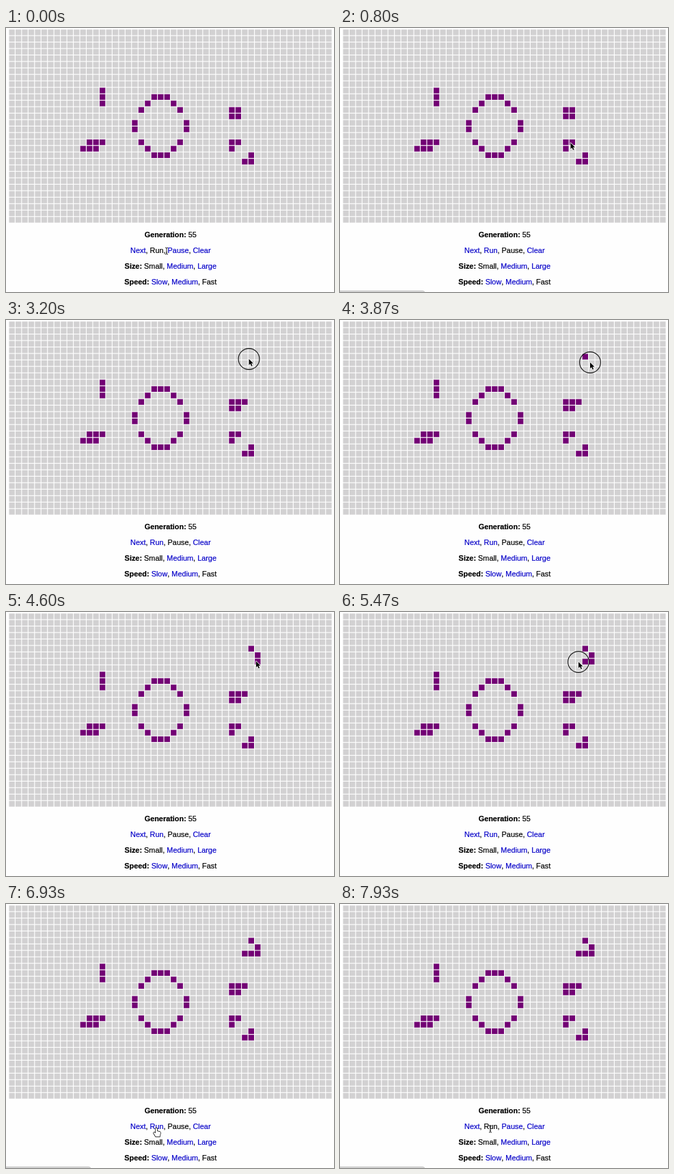
An HTML page with a canvas that plays this animation: 480x386 px, repeating every 8000 ms.

```html
<!DOCTYPE html>
<html lang="en">
<head>
<meta charset="utf-8">
<title>Game of Life</title>
<style>
  html, body { margin: 0; width: 100%; height: 100%; overflow: hidden; background: #fefefe; }
  canvas { display: block; }
</style>
</head>
<body>
<canvas id="stage" width="480" height="386"></canvas>
<script>
const ctx = document.getElementById('stage').getContext('2d');
const LOOP = 8000, COLS = 50, ROWS = 30;
const LEFT = 4.5, TOP = 2.25, PITCH_X = 9.465, PITCH_Y = 9.45, CELL = 8.3;
const PURPLE = '#720074', GREY = '#d2d1d2', LINK = '#0600c8', BLACK = '#000';

const alive = new Set();
const key = (col, row) => row * COLS + col;

function block(col, row, width, height = 1) {
  for (let y = 0; y < height; y++)
    for (let x = 0; x < width; x++) alive.add(key(col + x, row + y));
}

// Ring: one quadrant mirrored about its centre
for (const [dx, dy] of [[0, 4.5], [1, 4.5], [2, 3.5], [3, 2.5], [4, 0.5]])
  for (const sx of [-1, 1])
    for (const sy of [-1, 1]) block(23 + sx * dx, 14.5 + sy * dy, 1);

block(14, 9, 1, 3);
block(12, 17, 3);
block(11, 18, 3);
block(34, 12, 2, 2);
block(34, 17, 1, 2);
block(35, 17, 1);
block(37, 19, 1, 2);
block(36, 20, 1);

// The cursor stays at each stop for REST ms, then eases to the next
const REST = 250, PRESS = 30, RELEASE = 220;
const rest = (at, x, y) => ({ at, x, y, pressed: false });
const press = (at, x, y) => ({ at, x, y, pressed: true });
const stops = [
  rest(-180, 235, 326),
  press(190, 249, 326),
  rest(720, 337.5, 168),
  rest(1200, 371, 152),
  press(1740, 353, 121),
  rest(2160, 338, 122),
  press(3110, 355.5, 57),
  press(3750, 366, 62),
  press(4340, 366, 72),
  press(4930, 357, 73),
  press(5370, 349, 73),
  rest(6230, 234, 314),
  rest(6600, 220, 328),
  press(7660, 220, 329)
];
const clicks = stops.filter(stop => stop.pressed);
const [pauseClick, runClick] = [clicks[0], clicks[clicks.length - 1]];

function cursorAt(t) {
  const i = stops.findLastIndex(stop => t >= stop.at);
  const from = stops[i], to = stops[i + 1] || from;
  const leave = from.at + REST;
  if (t <= leave || to === from) return from;
  const k = (1 - Math.cos(Math.PI * (t - leave) / (to.at - leave))) / 2;
  return { x: from.x + (to.x - from.x) * k, y: from.y + (to.y - from.y) * k };
}

const isRunning = t => t < pauseClick.at + RELEASE || t >= runClick.at + RELEASE;

function cursorKind({ x, y }, t) {
  if (y < 318) return 'arrow';
  const overLink = isRunning(t) ? x > 236 : x < 232;
  return overLink ? 'hand' : 'beam';
}

function drawCell(col, row, color) {
  ctx.fillStyle = color;
  ctx.fillRect(LEFT + col * PITCH_X, TOP + row * PITCH_Y, CELL, CELL);
}

function drawGrid(t) {
  for (let row = 0; row < ROWS; row++)
    for (let col = 0; col < COLS; col++)
      drawCell(col, row, alive.has(key(col, row)) ? PURPLE : GREY);
  // A click on the grid brings the cell under it to life
  for (const { at, x, y } of clicks) {
    const col = Math.floor((x - LEFT) / PITCH_X), row = Math.floor((y - TOP) / PITCH_Y);
    if (row < ROWS && t >= at + RELEASE) drawCell(col, row, PURPLE);
  }
}

function setFont(weight) {
  ctx.font = weight + ' 10.9px "Liberation Sans", Arial, sans-serif';
}

// Centred line: optional bold label, then comma-separated items
function drawLine(baseline, label, items, isLink) {
  const parts = label ? [[label + ' ', 'bold', BLACK]] : [];
  items.forEach((item, i) => {
    if (i) parts.push([', ', 'normal', BLACK]);
    parts.push([item, 'normal', isLink(item) ? LINK : BLACK]);
  });
  const widths = parts.map(([text, weight]) => {
    setFont(weight);
    return ctx.measureText(text).width;
  });
  let x = 240.8 - widths.reduce((a, b) => a + b) / 2;
  ctx.lineWidth = 0.2;
  parts.forEach(([text, weight, color], i) => {
    setFont(weight);
    ctx.fillStyle = ctx.strokeStyle = color;
    ctx.fillText(text, x, baseline);
    ctx.strokeText(text, x, baseline);
    x += widths[i];
  });
}

function drawControls(t) {
  const lines = [
    ['Generation:', ['55']],
    ['', ['Next', 'Run', 'Pause', 'Clear'], isRunning(t) ? 'Run' : 'Pause'],
    ['Size:', ['Small', 'Medium', 'Large'], 'Small'],
    ['Speed:', ['Slow', 'Medium', 'Fast'], 'Fast']
  ];
  lines.forEach(([label, items, chosen], i) =>
    drawLine(306.2 + i * 23, label, items, item => chosen && item !== chosen));
}

// Browser status bar: appears over a link and lingers
function drawStatusBar(t) {
  if (t < 170 || (t > 1100 && t < 6480)) return;
  ctx.beginPath();
  ctx.roundRect(-4, 384.4, 128, 8, 3);
  ctx.fillStyle = '#dcdcdc';
  ctx.strokeStyle = '#b4b4b4';
  ctx.lineWidth = 0.8;
  ctx.fill();
  ctx.stroke();
}

const shapes = {
  arrow: new Path2D('M0 0V9L2 7L3.6 10.6L5.1 10L3.6 6.5H6.5Z'),
  hand: new Path2D('M-1 0Q0-1 1 0V4L5 5Q6 5 6 7L5 12H-1L-4 7Q-4 5-1 7Z'),
  beam: new Path2D('M-2-5Q0-5 0-3.5Q0-5 2-5M0-3.5V3.5M-2 5Q0 5 0 3.5Q0 5 2 5M-1 2H1')
};

function drawCursor(t) {
  const position = cursorAt(t), kind = cursorKind(position, t), shape = shapes[kind];
  ctx.save();
  ctx.translate(position.x, position.y);
  if (clicks.some(({ at }) => t >= at + PRESS && t < at + RELEASE)) {
    ctx.beginPath();
    ctx.arc(0, 0, 15.4, 0, 2 * Math.PI);
    ctx.strokeStyle = '#111';
    ctx.lineWidth = 1.1;
    ctx.stroke();
  }
  ctx.lineJoin = 'round';
  if (kind === 'beam') {
    ctx.strokeStyle = '#222';
    ctx.lineWidth = 1;
    ctx.stroke(shape);
  } else {
    const [outline, fill] = kind === 'arrow' ? ['#fff', '#000'] : ['#000', '#fff'];
    ctx.strokeStyle = outline;
    ctx.lineWidth = 1.4;
    ctx.stroke(shape);
    ctx.fillStyle = fill;
    ctx.fill(shape);
  }
  ctx.restore();
}

function render(t) {
  ctx.fillStyle = '#fefefe';
  ctx.fillRect(0, 0, 480, 386);
  drawGrid(t);
  drawControls(t);
  drawStatusBar(t);
  drawCursor(t);
}

const start = performance.now();
function tick() {
  render((performance.now() - start) % LOOP);
  requestAnimationFrame(tick);
}
tick();
</script>
</body>
</html>
```
